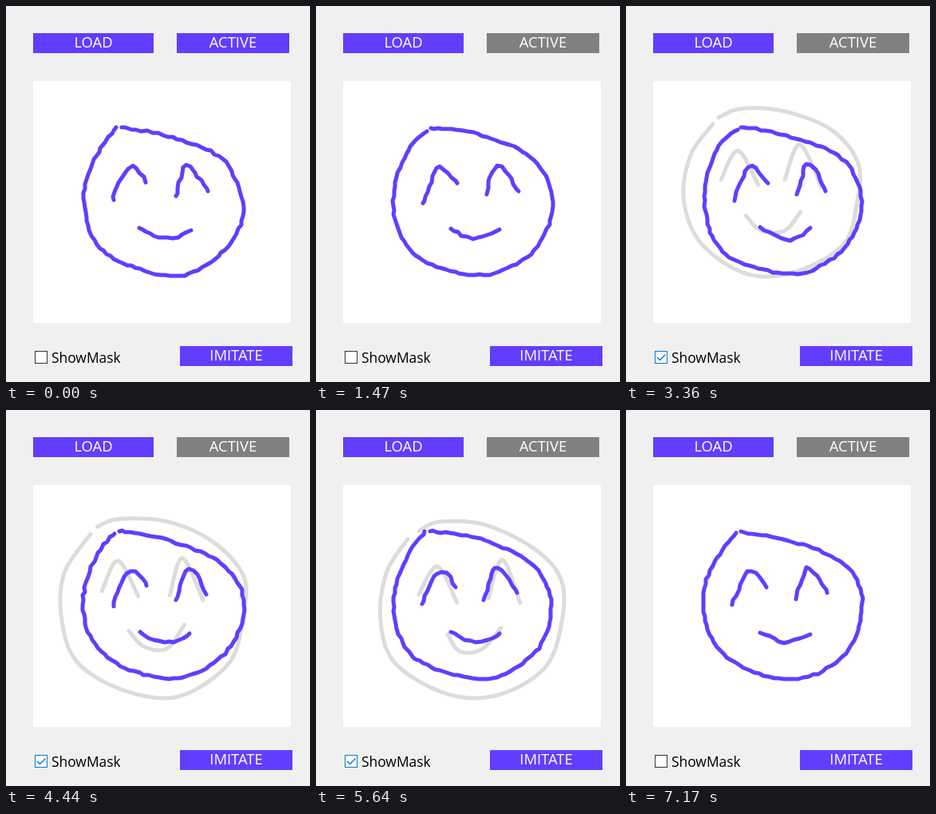
Write an HTML page with a canvas that moves like this. It is 381x471 px and loops after 7.2 s.

```html
<!DOCTYPE html>
<html lang="en">
<head>
<meta charset="utf-8">
<title>Drawing imitation</title>
<style>
html, body { margin: 0; width: 100%; height: 100%; overflow: hidden; background: #f0f0f0; }
canvas { display: block; width: 381px; height: 471px; }
</style>
</head>
<body>
<canvas id="stage"></canvas>
<script>
const W = 381, H = 471, LOOP = 7200, STEP = 30;
const PURPLE = '#633dff', GRAY = '#808080', MASK = '#dcdcdc', BLUE = '#0078d7';
const START = 270, HOVER_IN = 2340, CHECK = 2910, UNCHECK = 5880, HOVER_OUT = 6150;

const canvas = document.getElementById('stage');
const ctx = canvas.getContext('2d');
const dpr = window.devicePixelRatio || 1;
canvas.width = W * dpr;
canvas.height = H * dpr;
ctx.scale(dpr, dpr);

// Strokes of a face: outline, left eye, right eye, mouth
const face = (...strokes) => strokes.map(text => text.split(' ').map(p => p.split(',').map(Number)));

const smile = face(
  '143,153 203,162 266,188 293,226 294,268 270,308 222,335 168,331 122,308 100,268 99,222 118,177 138,155',
  '133,245 140,226 152,203 163,204 176,221',
  '213,238 219,214 227,198 238,207 252,230',
  '168,278 184,287 199,292 215,288 230,281');

const sample = face(
  '125,143 150,133 208,135 268,163 303,203 301,255 284,310 224,346 160,343 100,308 81,250 86,196 115,152',
  '128,223 148,186 175,229',
  '212,226 230,180 254,234',
  '160,270 180,289 208,290 230,264');

function random(seed) {
  let s = (seed * 7919 + 12345) >>> 0;
  return () => {
    s = (s + 0x6d2b79f5) >>> 0;
    let v = Math.imul(s ^ (s >>> 15), s | 1);
    v ^= v + Math.imul(v ^ (v >>> 7), v | 61);
    return ((v ^ (v >>> 14)) >>> 0) / 4294967296;
  };
}

const spread = (rnd, amount) => (rnd() * 2 - 1) * amount;
const shake = (pts, rnd, amount) => pts.map(p => p.map(v => v + spread(rnd, amount)));

// Catmull-Rom curve, sampled about every `gap` pixels
function curve(pts, gap) {
  const at = i => pts[Math.max(0, Math.min(pts.length - 1, i))];
  const out = [pts[0]];
  for (let i = 0; i < pts.length - 1; i++) {
    const [a, b, c, d] = [at(i - 1), at(i), at(i + 1), at(i + 2)];
    const n = Math.max(1, Math.round(Math.hypot(c[0] - b[0], c[1] - b[1]) / gap));
    for (let j = 1; j <= n; j++) {
      const u = j / n;
      out.push(b.map((v, k) => v + 0.5 * u * (c[k] - a[k] +
        u * (2 * a[k] - 5 * v + 4 * c[k] - d[k] + u * (3 * (v - c[k]) + d[k] - a[k])))));
    }
  }
  return out;
}

// The imitation: loose key points and a jagged line
function faceAt(tick) {
  const rnd = random(tick);
  return smile.map(stroke =>
    shake(curve(shake(stroke, rnd, 2), 6), rnd, 1).map(p => p.map(Math.round)));
}

// The hand-drawn sample: another place and size, and a smooth line
function maskAt(tick) {
  const rnd = random(tick + 1000);
  const dx = spread(rnd, 12), dy = spread(rnd, 12), size = 1 + spread(rnd, 0.07);
  return sample.map(stroke => curve(shake(stroke, rnd, 3).map(([x, y]) =>
    [195 + (x - 195) * size + dx, 240 + (y - 240) * size + dy]), 6));
}

// Nothing moves before the start; now and then a redraw misses its step
function redrawTick(t, masked) {
  if (t < START) return 0;
  const tick = Math.floor(t / STEP);
  return random(tick + 5000)() < (masked ? 0.15 : 0.06) ? tick - 1 : tick;
}

function drawLine(pts, color, width, shape) {
  ctx.strokeStyle = color;
  ctx.lineWidth = width;
  ctx.lineCap = shape === 'round' ? 'round' : 'butt';
  ctx.lineJoin = shape;
  ctx.beginPath();
  pts.forEach(([x, y]) => ctx.lineTo(x, y));
  ctx.stroke();
}

const drawFace = (strokes, color) => strokes.forEach(pts => drawLine(pts, color, 5, 'round'));

function box(x, y, w, h, color) {
  ctx.fillStyle = color;
  ctx.fillRect(x, y, w, h);
}

function label(text, x, y, size, color, align) {
  ctx.font = size + 'px "Open Sans", sans-serif';
  ctx.textAlign = align;
  ctx.fillStyle = color;
  ctx.fillText(text, x, y);
}

function button(text, x, y, w, color) {
  box(x, y, w, 25, color);
  label(text, x + w / 2, y + 18, 18.4, '#fff', 'center');
}

function checkbox(checked, hover) {
  box(36, 432, 16, 16, hover ? BLUE : '#333');
  box(37, 433, 14, 14, '#fff');
  if (checked) drawLine([[39, 440], [42.5, 443.5], [49.5, 436.5]], BLUE, 1.4, 'miter');
  label('ShowMask', 57, 447, 17.4, '#000', 'left');
}

function draw(time) {
  const t = time % LOOP;
  const masked = t >= CHECK && t < UNCHECK;
  const tick = redrawTick(t, masked);

  box(0, 0, W, H, '#f0f0f0');
  button('LOAD', 34, 34, 151, PURPLE);
  button('ACTIVE', 214, 34, 141, t < START ? PURPLE : GRAY);
  button('IMITATE', 218, 426, 141, PURPLE);
  checkbox(masked, t >= HOVER_IN && t < HOVER_OUT);

  box(34, 94, 323, 303, '#fff');
  if (masked) drawFace(maskAt(tick), MASK);
  drawFace(faceAt(tick), PURPLE);
}

const begin = performance.now();
function frame() {
  draw(performance.now() - begin);
  requestAnimationFrame(frame);
}
frame();
</script>
</body>
</html>
```
